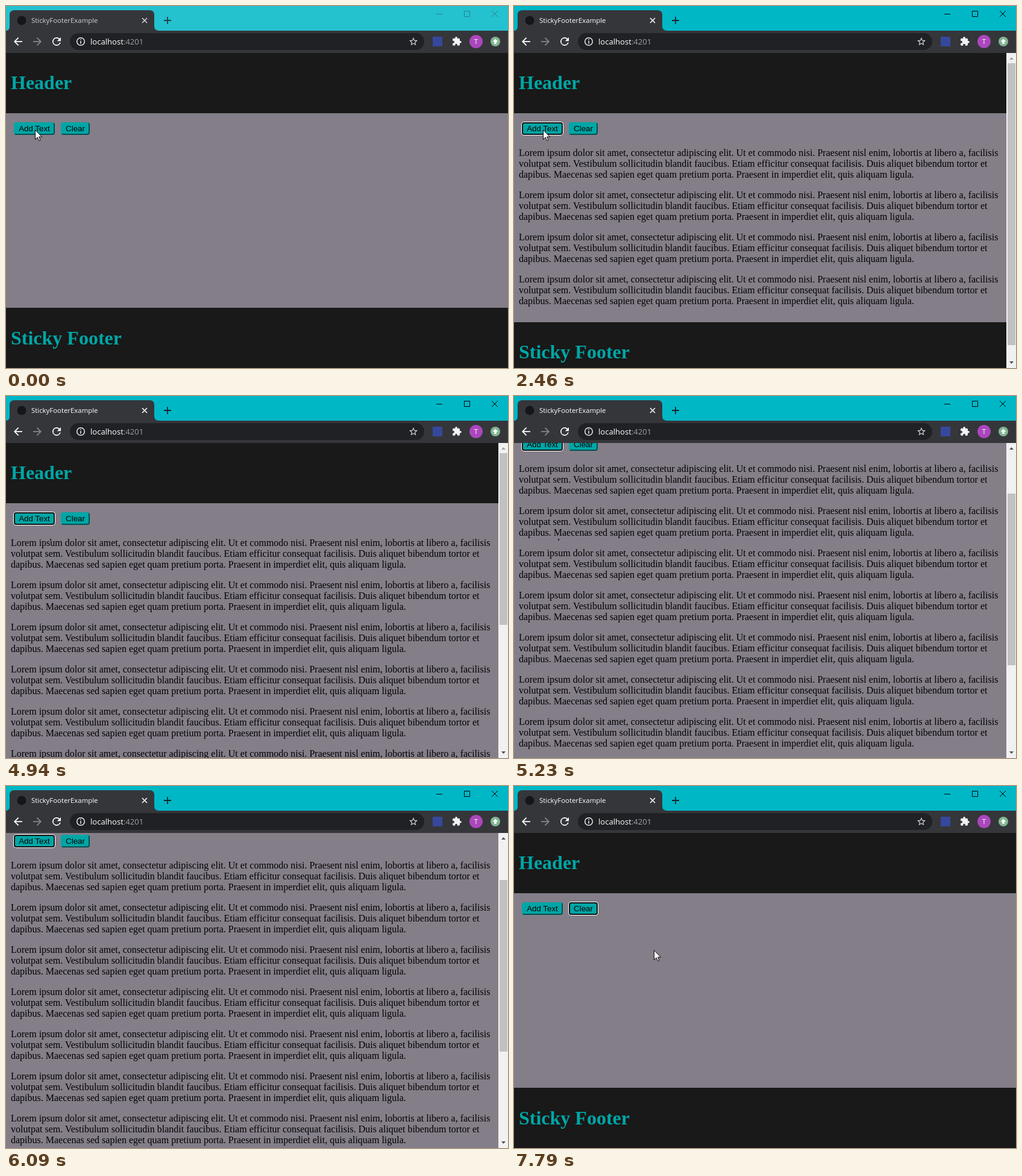
Recreate the animation shown at these times as an HTML page. Size 833 by 601 pixels, loop 8.49 s.

```html
<!DOCTYPE html>
<html lang="en">
<head>
<meta charset="utf-8">
<title>StickyFooterExample</title>
<style>
  html, body { margin: 0; width: 100%; height: 100%; overflow: hidden; background: #181918; }
  #stage { position: relative; width: 833px; height: 601px; overflow: hidden; }
  #view { position: absolute; top: 78px; width: 833px; height: 523px; overflow: hidden; }
  #page { position: absolute; top: 0; left: 0; width: 833px; font: 16px/18px "Liberation Serif", serif; color: #000; }
  #main { position: absolute; top: 100px; width: 100%; background: #847e89; }
  #text { position: absolute; top: 57px; left: 8px; white-space: pre; }
  #text p { margin: 0 0 16px; }
  .bar { position: absolute; width: 100%; height: 100px; background: #181918; }
  h1 { position: absolute; left: 8px; top: 31px; margin: 0; font-size: 32px; line-height: 37px; color: #00a6a6; }
  .button {
    position: absolute; top: 15px; height: 21px; box-sizing: border-box;
    border: 2px outset #00a6a6; border-radius: 4px; background: #00a6a6;
    font: 13.333px/17px "Liberation Sans", sans-serif; text-align: center; white-space: nowrap;
  }
  .button.focus { border: 2px solid #101010; box-shadow: 0 0 0 1px #fff; }
  .button.pressed { color: #0b3a3b; }
  #add { left: 13px; width: 68px; }
  #clear { left: 91px; width: 48px; }
  svg { position: absolute; top: 0; left: 0; }
  svg text { font-family: "Open Sans", sans-serif; }
  .line { fill: none; stroke: currentColor; }
</style>
</head>
<body>
<div id="stage">
  <div id="view">
    <div id="page">
      <div class="bar"><h1>Header</h1></div>
      <div id="main">
        <div class="button" id="add">Add Text</div>
        <div class="button" id="clear">Clear</div>
        <div id="text"></div>
      </div>
      <div class="bar" id="footer"><h1>Sticky Footer</h1></div>
    </div>
  </div>
  <svg width="833" height="601" viewBox="0 0 833 601">
    <defs>
      <path id="arrow" d="M20 11H7.83l5.59-5.59L12 4l-8 8 8 8 1.41-1.41L7.83 13H20z"/>
    </defs>

    <rect id="titlebar" width="833" height="41"/>
    <path fill="#35363a" d="M0 41q6 0 6-7V15q0-8 8-8H238q8 0 8 8V33q0 8 8 8H833V78H0z"/>
    <circle cx="26" cy="24" r="7.5" fill="#151619"/>
    <g id="tab">
      <text x="42" y="28" font-size="11.4" fill="currentColor">StickyFooterExample</text>
      <path class="line" stroke-width="1.6" d="M226 20l8 8m0-8l-8 8"/>
    </g>
    <path id="plus" class="line" stroke-width="1.8" d="M262 24h12m-6-6v12"/>
    <path id="controls" class="line" d="M714 13.5h10M760.5 8.5h9v9h-9zM806 8l10 10m0-10l-10 10"/>

    <use href="#arrow" fill="#fff" transform="translate(9.5 48.5) scale(.875)"/>
    <use href="#arrow" fill="#85868a" transform="translate(62.5 48.5) scale(-.875 .875)"/>
    <path fill="#fff" transform="translate(73.5 48.5) scale(.875)"
      d="M17.65 6.35A8 8 0 1 0 19.73 14h-2.08A6 6 0 1 1 12 6c1.66 0 3.14.69 4.22 1.78L13 11h7V4z"/>
    <rect x="106" y="45" width="588" height="28" rx="14" fill="#202124"/>
    <g color="#e8eaed">
      <circle class="line" cx="124" cy="59" r="6.3" stroke-width="1.5"/>
      <path class="line" stroke-width="1.6" d="M124 58v4.5m0-7.5v1.6"/>
    </g>
    <text x="140" y="64" font-size="13.1" fill="#fff">localhost<tspan fill="#9aa0a6">:4201</tspan></text>
    <path fill="#dadce0" transform="translate(667.6 50.6) scale(.7)"
      d="M22 9.24l-7.19-.62L12 2 9.19 8.63 2 9.24l5.46 4.73L5.82 21 12 17.27 18.18 21l-1.63-7.03zM12 15.4l-3.76 2.27 1-4.28-3.32-2.88 4.38-.38L12 6.1l1.71 4.04 4.38.38-3.32 2.88 1 4.28z"/>
    <rect x="708" y="51" width="16" height="16" fill="#36489c"/>
    <path fill="#f1f3f4" transform="translate(739.7 50.3) scale(.7)"
      d="M20.5 11H19V7c0-1.1-.9-2-2-2h-4V3.5a2.5 2.5 0 0 0-5 0V5H4c-1.1 0-2 .9-2 2v3.8h1.5a2.7 2.7 0 0 1 0 5.4H2V20c0 1.1.9 2 2 2h3.8v-1.5a2.7 2.7 0 0 1 5.4 0V22H17c1.1 0 2-.9 2-2v-4h1.5a2.5 2.5 0 0 0 0-5z"/>
    <circle cx="780" cy="59" r="11" fill="#ab47bc"/>
    <text x="780" y="63.3" font-size="11.5" fill="#fff" text-anchor="middle">T</text>
    <circle cx="812" cy="59" r="8" fill="#81b592"/>
    <path fill="#fff" d="M812 54.5l4.5 4.7h-2.7v3.8h-3.6v-3.8h-2.7z"/>

    <g id="scrollbar">
      <rect x="817" y="78" width="16" height="523" fill="#f1f1f1"/>
      <rect id="thumb" x="819" width="13" fill="#c1c1c1"/>
      <path id="up" d="M822 89l3.5-4 3.5 4z"/>
      <path id="down" d="M822 590l3.5 4 3.5-4z"/>
    </g>

    <rect id="beam" x="73" y="237" width="2" height="3" fill="#222"/>
    <path id="pointer" fill="#fff" stroke="#000" d="M.5.8V16.5l3.7-3.4 2.5 5.6 2.3-1-2.4-5.5h4.9z"/>
    <circle id="click" cy="205" r="11.5" fill="#ff0" fill-opacity=".5"/>
  </svg>
</div>
<script>
const LOOP = 8490, FRAME = 75.8, VIEW = 523, TRACK = 489;
const $ = id => document.getElementById(id);

const lorem = `Lorem ipsum dolor sit amet, consectetur adipiscing elit. Ut et commodo nisi. Praesent nisl enim, lobortis at libero a, facilisis
volutpat sem. Vestibulum sollicitudin blandit faucibus. Etiam efficitur consequat facilisis. Duis aliquet bibendum tortor et
dapibus. Maecenas sed sapien eget quam pretium porta. Praesent in imperdiet elit, quis aliquam ligula.`;

// Mouse down and up on "Add Text"; each release adds a paragraph.
const addClicks = [[570, 730], [1200, 1350], [1750, 1820], [2290, 2460], [2760, 2920],
                   [3240, 3390], [3700, 3770], [4000, 4170], [4400, 4550]];
const clearClick = [7100, 7250];

const scrollKeys = [[5003, 0], [5230, 123], [5450, 330], [5533, 374], [5859, 374], [5860, 350], [6087, 112], [6240, 0]];
const pointerX = [[4700, 48], [4851, 73], [6390, 73], [6694, 96], [6921, 102], [7405, 102], [7783, 232]];
const pointerY = [[4700, 205], [4851, 238], [6390, 238], [6694, 215], [6921, 205], [7405, 205], [7783, 272]];

const paragraphs = addClicks.map(() => {
  const p = document.createElement("p");
  p.textContent = lorem;
  return $("text").appendChild(p);
});

const within = (t, [from, to]) => t >= from && t < to;
const show = (element, visible) => { element.style.display = visible ? "" : "none"; };

function track(keys, t) {
  if (t <= keys[0][0]) return keys[0][1];
  for (let i = 1; i < keys.length; i++) {
    const [t0, a] = keys[i - 1], [t1, b] = keys[i];
    if (t < t1) return a + (b - a) * (t - t0) / (t1 - t0);
  }
  return keys[keys.length - 1][1];
}

// Motion advances at the recording's frame rate, restarting with each gesture.
function stepTime(t) {
  const start = [7480, 5860, 4775].find(s => t >= s);
  return start ? start + Math.floor((t - start) / FRAME) * FRAME : 0;
}

function drawWindow(active) {
  $("titlebar").setAttribute("fill", active ? "#00b7c6" : "#24c1ce");
  $("tab").style.color = active ? "#fff" : "#cfd1d3";
  $("plus").style.color = active ? "#10282c" : "#1d4147";
  $("controls").style.color = active ? "#000" : "#2b818a";
}

function drawPage(t, count, scroll) {
  const mainHeight = Math.max(323, 67 + 70 * count);
  const height = mainHeight + 200;
  const overflow = height > VIEW;
  paragraphs.forEach((p, i) => show(p, i < count));
  $("page").style.top = -scroll + "px";
  $("main").style.height = mainHeight + "px";
  $("footer").style.top = mainHeight + 100 + "px";
  $("footer").firstChild.style.top = overflow ? "31px" : "32px";

  show($("scrollbar"), overflow);
  $("thumb").setAttribute("y", 95 + Math.round(scroll * TRACK / height));
  $("thumb").setAttribute("height", Math.round(VIEW * TRACK / height));
  $("up").setAttribute("fill", scroll > 0 ? "#505050" : "#a3a3a3");
  $("down").setAttribute("fill", scroll < height - VIEW ? "#505050" : "#a3a3a3");
}

function drawMouse(t, step, adding, clearing) {
  const reading = within(t, [4851, 6390]);
  const x = Math.round(track(pointerX, step)), y = Math.round(track(pointerY, step));
  show($("beam"), reading);
  show($("pointer"), !reading);
  $("pointer").setAttribute("transform", `translate(${x} ${y})`);
  show($("click"), adding || clearing);
  $("click").setAttribute("cx", x);
}

function draw(t) {
  const step = stepTime(t);
  const adding = addClicks.some(click => within(t, click));
  const clearing = within(t, clearClick);
  const count = t < clearClick[1] ? addClicks.filter(click => t >= click[1]).length : 0;

  drawWindow(t >= 570);
  drawPage(t, count, Math.round(track(scrollKeys, step)));
  $("add").classList.toggle("focus", within(t, [570, clearClick[0]]));
  $("add").classList.toggle("pressed", adding);
  $("clear").classList.toggle("focus", t >= clearClick[0]);
  $("clear").classList.toggle("pressed", clearing);
  drawMouse(t, step, adding, clearing);
}

const origin = performance.now();
function tick() {
  draw((performance.now() - origin) % LOOP);
  requestAnimationFrame(tick);
}
tick();
</script>
</body>
</html>
```
